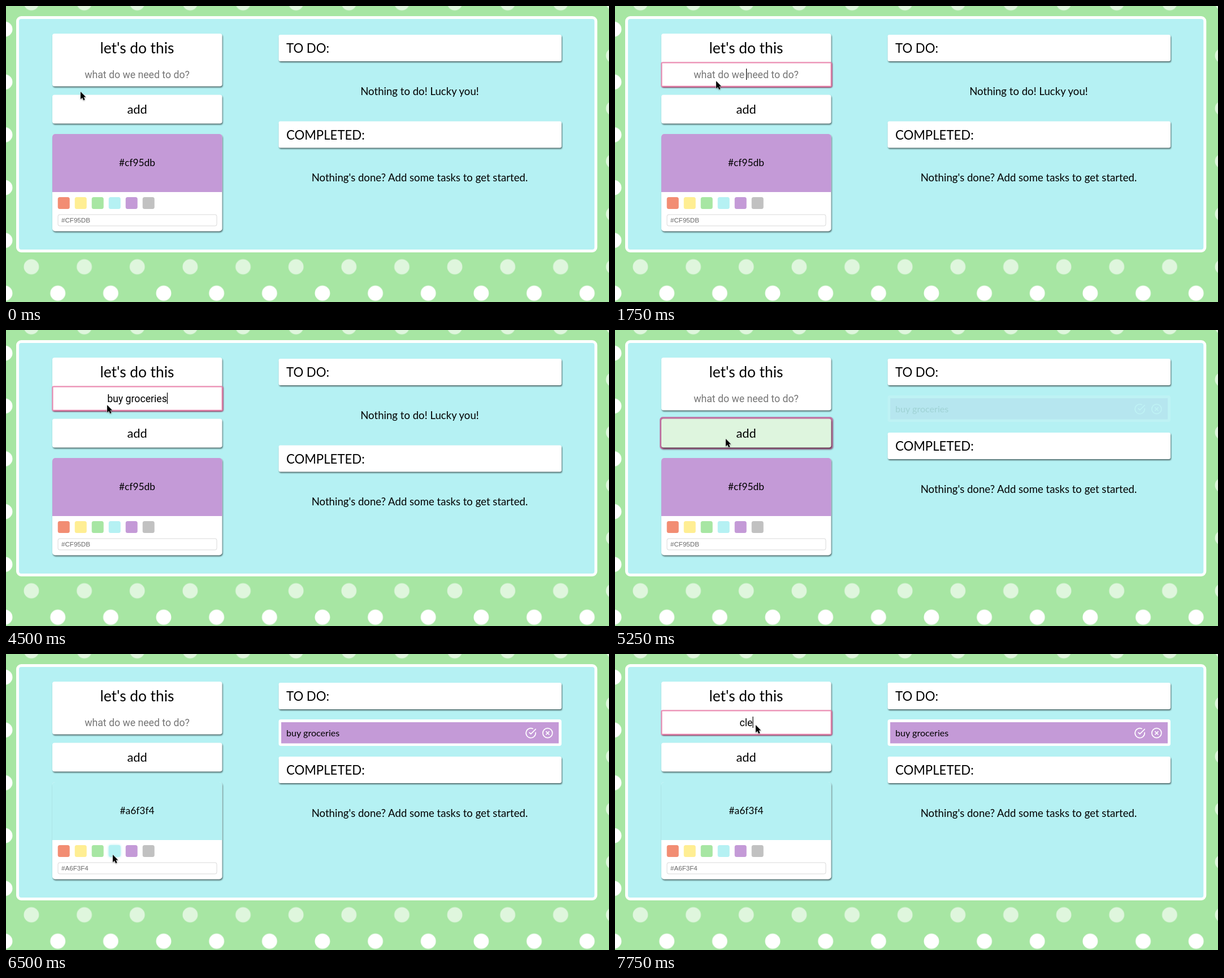
Write an HTML page that moves like this. It is 1067x525 px and loops after 8 s.

```html
<!DOCTYPE html>
<html lang="en">
<head>
<meta charset="utf-8">
<title>To-do list</title>
<style>
  html, body { margin: 0; width: 100%; height: 100%; overflow: hidden; background: #a7e6a3; }
  svg { display: block; width: 100%; height: 100%; }
  text { font-family: Lato, sans-serif; white-space: pre; }
  .card { fill: #fff; filter: drop-shadow(1.5px 2px 1.2px rgba(0, 0, 0, .55)); }
  .mid { text-anchor: middle; }
  .head { font-size: 22.2px; }
  .note { font-size: 18.6px; text-anchor: middle; }
  .field { font-family: Roboto, sans-serif; font-size: 17.7px; text-anchor: middle; }
  .hex { font-family: "Liberation Sans", Arial, sans-serif; font-size: 11.6px; fill: #666; }
  .focus { fill: #fff; stroke: #ec8ab1; stroke-width: 2; filter: drop-shadow(1px 1.5px 1.3px rgba(165, 30, 85, .85)); }
  .icon { fill: none; stroke: #fff; stroke-width: 2; stroke-linecap: round; stroke-linejoin: round; }
</style>
</head>
<body>
<svg viewBox="0 0 1067 525" preserveAspectRatio="none">
  <defs>
    <pattern id="dots" x="44.9" y="-52.5" width="93.65" height="93.65" patternUnits="userSpaceOnUse">
      <g fill="#fff">
        <circle cx="46.8" cy="0" r="13.4"/>
        <circle cx="46.8" cy="93.65" r="13.4"/>
        <g opacity=".63">
          <circle cx="0" cy="46.8" r="13.4"/>
          <circle cx="93.65" cy="46.8" r="13.4"/>
        </g>
      </g>
    </pattern>
  </defs>
  <rect width="1067" height="525" fill="#a7e6a3"/>
  <rect width="1067" height="525" fill="url(#dots)"/>
  <rect x="20.5" y="20.5" width="1023.3" height="414" rx="6.5" fill="#b5f1f3" stroke="#fff" stroke-width="5"/>

  <rect class="card" x="82" y="49" width="300.5" height="93.5" rx="4"/>
  <text class="mid" x="232" y="84" font-size="26.3">let's do this</text>
  <rect id="fieldRing" class="focus" x="82.5" y="100.5" width="300" height="42" rx="1"/>
  <text id="field" class="field" x="232" y="127.5"></text>
  <rect id="caret" y="111" width="1.2" height="20"/>

  <rect id="addRing" x="80.3" y="155.3" width="304" height="55" rx="4" fill="#c171a1" stroke="#c171a1" stroke-width="2"
    style="filter:drop-shadow(1px 1px 1px rgba(80,20,60,.5))"/>
  <rect id="add" class="card" x="82" y="157.5" width="300.5" height="51" rx="4"/>
  <text class="mid" x="232" y="190.5" font-size="21.8">add</text>

  <rect class="card" x="82" y="227" width="300.5" height="172.5" rx="5"/>
  <path id="preview" d="M82 330V232a5 5 0 0 1 5-5H377.5a5 5 0 0 1 5 5V330z"/>
  <text id="previewText" class="mid" x="232" y="284" font-size="17.4"></text>
  <g id="swatches"></g>
  <rect x="92" y="370" width="281" height="20" rx="3" fill="#fff" stroke="#d9d9d9"/>
  <text id="hex" class="hex" x="98" y="384.3"></text>

  <rect class="card" x="482.5" y="51" width="500.5" height="47" rx="3"/>
  <text class="head" x="496" y="83">TO DO:</text>
  <text id="empty" class="note" x="732" y="157.5">Nothing to do! Lucky you!</text>
  <g id="item">
    <rect x="482.5" y="116" width="500.5" height="47" rx="4" fill="#fff"/>
    <rect x="487" y="121" width="491" height="37.5" fill="#c49ad7"/>
    <text x="496" y="145.5" font-size="16.1">buy groceries</text>
    <g class="icon">
      <path transform="translate(918.5 130) scale(.85)" d="M22 11.1V12a10 10 0 1 1-5.9-9.1M22 4 12 14l-3-3"/>
      <path transform="translate(948.2 130) scale(.85)" d="M2 12a10 10 0 1 1 20 0a10 10 0 1 1-20 0M15 9l-6 6M9 9l6 6"/>
    </g>
  </g>
  <g id="done">
    <rect class="card" x="482.5" y="204.5" width="500.5" height="47" rx="3"/>
    <text class="head" x="496" y="236.5">COMPLETED:</text>
    <text class="note" x="732" y="311">Nothing's done? Add some tasks to get started.</text>
  </g>

  <path id="pointer" d="M0 0V13.2L3 10.4L5.2 15.2L7.6 14.1L5.4 9.5H9.3z" fill="#000" stroke="#fff" stroke-width="1"
    style="paint-order:stroke;filter:drop-shadow(0 1px 1px rgba(0,0,0,.35))"/>
</svg>
<script>
const LOOP = 8000, TICK = 250;
const $ = id => document.getElementById(id);
const show = (id, on) => $(id).setAttribute("visibility", on ? "visible" : "hidden");

// Each track is a list of [start time, value]; a value holds until the next one.
const at = (track, t) => track.reduce((value, [start, next]) => t >= start ? next : value, track[0][1]);

const pointerTrack = [
  [0, [132, 152]], [500, [134, 149]], [750, [138, 141]], [1000, [143, 132]], [1250, [151, 124]],
  [1500, [163, 119]], [1750, [179, 133]], [4750, [190, 183]], [5000, [196, 193]], [5500, [195, 226]],
  [5750, [192, 273]], [6000, [190, 334]], [6250, [189, 354]], [6500, [189, 356]],
  [6750, [196, 326]], [7000, [224, 217]], [7250, [249, 126]]
];
const typedTrack = [
  [0, ""], [2250, 1], [2500, 2], [2750, 3], [3000, 4], [3250, 5], [3750, 7], [4000, 9],
  [4250, 11], [4500, 13], [5250, ""], [7500, "c"], [7750, "cle"]
];
const focusTrack = [[0, ""], [1750, "field"], [5000, "add"], [6250, ""], [7250, "field"]];
const fadeTrack = [[0, 0], [5250, .12], [5500, .55], [5750, .92], [6000, 1]];

const colors = ["#f28d73", "#ffee93", "#a7e6a3", "#b5f1f3", "#c49ad7", "#c1c1c1"];
const swatches = colors.map((color, i) => {
  const rect = document.createElementNS("http://www.w3.org/2000/svg", "rect");
  const attrs = { x: 91.7 + i * 30, y: 339, width: 21, height: 21, rx: 3.5, fill: color };
  for (const name in attrs) rect.setAttribute(name, attrs[name]);
  return $("swatches").appendChild(rect);
});

function setField(t, focused) {
  const typed = at(typedTrack, t);
  const value = typeof typed === "number" ? "buy groceries".slice(0, typed) : typed;
  const field = $("field");
  field.textContent = value || "what do we need to do?";
  field.setAttribute("fill", value ? "#000" : "#757575");
  const half = value ? field.getComputedTextLength() / 2 : 0;
  $("caret").setAttribute("x", 232 + half);
  show("caret", focused);
  show("fieldRing", focused);
}

function setColor(picked) {
  const code = picked ? "#a6f3f4" : "#cf95db";
  $("preview").setAttribute("fill", colors[picked ? 3 : 4]);
  $("previewText").textContent = code;
  $("hex").textContent = code.toUpperCase();
}

function draw(time) {
  const t = Math.floor(time % LOOP / TICK) * TICK;
  const focus = at(focusTrack, t);
  const added = t >= 5250;
  setField(t, focus === "field");
  setColor(t >= 6250);

  show("addRing", focus === "add");
  $("add").style.fill = t >= 4750 && t < 5500 ? "#def5de" : "#fff";
  swatches[3].style.filter = t >= 6250 && t < 6750 ? "drop-shadow(0 0 2px #b5f1f3)" : "none";

  show("empty", !added);
  $("item").setAttribute("opacity", at(fadeTrack, t));
  $("done").setAttribute("transform", `translate(0 ${added ? -22.5 : 0})`);
  $("pointer").setAttribute("transform", `translate(${at(pointerTrack, t)})`);
}

const begin = performance.now();
function loop() {
  draw(performance.now() - begin);
  requestAnimationFrame(loop);
}
loop();
</script>
</body>
</html>
```
